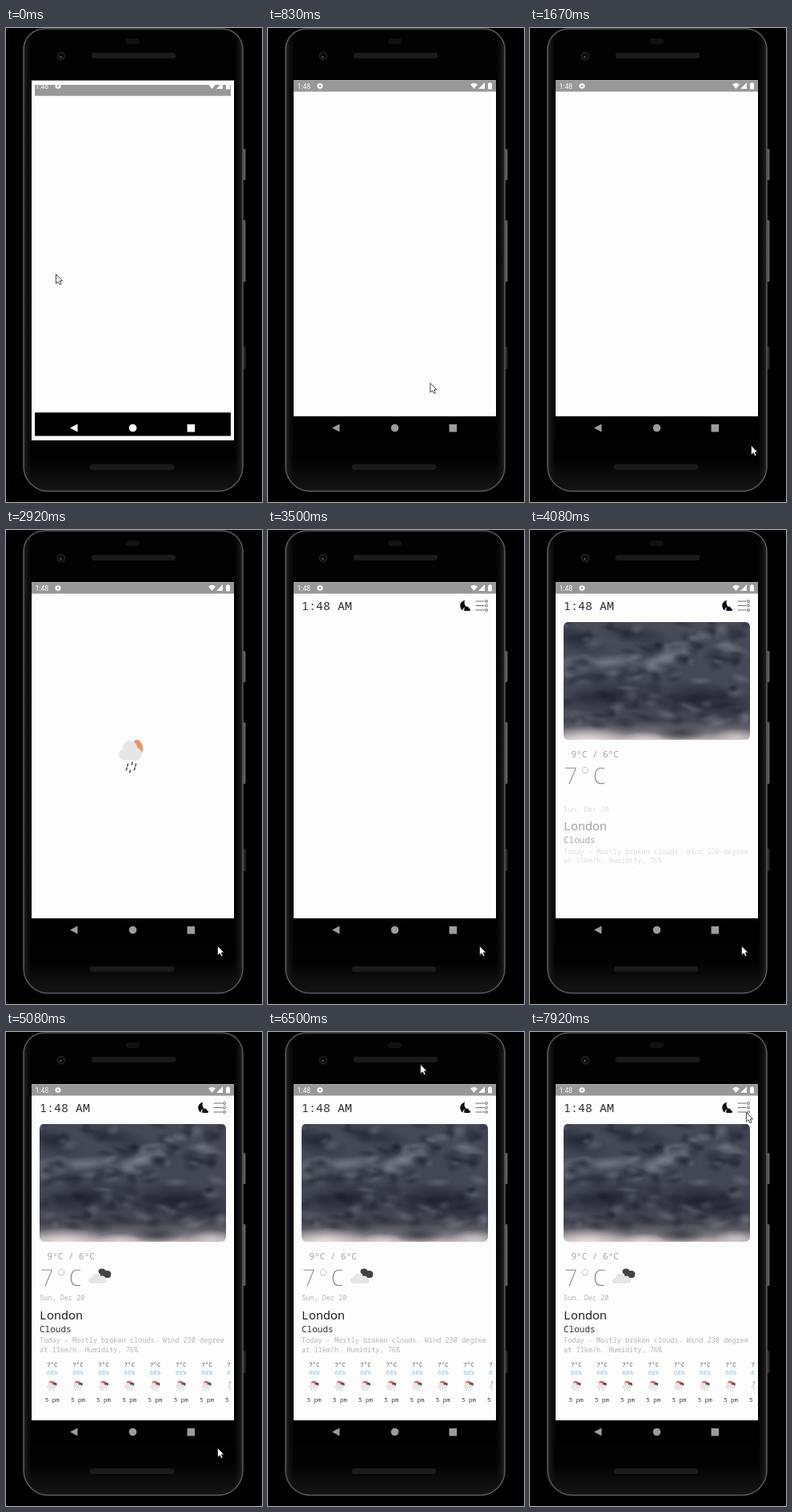
Recreate the animation shown at these times as an HTML page with a canvas. Size 320 by 592 pixels, loop 8 s.

```html
<!DOCTYPE html>
<html lang="en">
<head>
<meta charset="utf-8">
<title>Weather app</title>
<style>
html, body { margin: 0; width: 100%; height: 100%; overflow: hidden; background: #000; }
canvas { display: block; width: 320px; height: 592px; }
</style>
</head>
<body>
<canvas id="stage"></canvas>
<script>
const LOOP = 8000, STEP = 1000 / 12;
const MONO = '"Noto Sans Mono", "DejaVu Sans Mono", monospace';
const PAPER = '#fdfdfd', CLOUD = '#e6e6e8', BAR = '#989898', FAINT = '#b4b4b8';
const canvas = document.getElementById('stage');
const dpr = window.devicePixelRatio || 1;
canvas.width = 320 * dpr;
canvas.height = 592 * dpr;
const ctx = canvas.getContext('2d');

const clamp = v => Math.max(0, Math.min(1, v));
const easeOut = v => 1 - (1 - clamp(v)) ** 1.7;
const mix = (a, b, p) => a + (b - a) * p;

function rect(x, y, w, h, color, r = 0, c = ctx) {
  c.fillStyle = color;
  c.beginPath();
  c.roundRect(x, y, w, h, r);
  c.fill();
}
function oval(x, y, rx, ry, color, rot = 0) {
  ctx.fillStyle = color;
  ctx.beginPath();
  ctx.ellipse(x, y, rx, ry, rot, 0, 7);
  ctx.fill();
}
function poly(color, ...pts) {
  ctx.fillStyle = color;
  ctx.beginPath();
  for (let i = 0; i < pts.length; i += 2) ctx.lineTo(pts[i], pts[i + 1]);
  ctx.closePath();
  ctx.fill();
}
function line(x1, y1, x2, y2, color, w = 1) {
  ctx.strokeStyle = color;
  ctx.lineWidth = w;
  ctx.beginPath();
  ctx.moveTo(x1, y1);
  ctx.lineTo(x2, y2);
  ctx.stroke();
}
function text(str, x, y, size, color, weight = 400, align = 'left', family = MONO) {
  ctx.font = `${weight} ${size}px ${family}`;
  ctx.textAlign = align;
  ctx.fillStyle = color;
  ctx.fillText(str, x, y);
}
// Shaves the glyph edges for a hairline weight
function thinText(str, x, y, size, color) {
  text(str, x, y, size, color, 100);
  ctx.strokeStyle = PAPER;
  ctx.lineWidth = 1.4;
  ctx.lineJoin = 'round';
  ctx.strokeText(str, x, y);
}
function layer(alpha, dy, draw) {
  if (alpha <= 0) return;
  ctx.save();
  ctx.globalAlpha = alpha;
  ctx.translate(0, dy);
  draw();
  ctx.restore();
}

// Soft stormy sky, painted once
function paintSky() {
  const s = document.createElement('canvas');
  s.width = 466;
  s.height = 294;
  const c = s.getContext('2d');
  c.scale(2, 2);
  const g = c.createLinearGradient(0, 0, 0, 147);
  g.addColorStop(0, '#464a58');
  g.addColorStop(0.5, '#434754');
  g.addColorStop(0.84, '#41444f');
  g.addColorStop(0.94, '#77757c');
  g.addColorStop(1, '#bcb3b3');
  rect(0, 0, 233, 147, g, 0, c);
  const blob = (x, y, rx, ry, rot, rgb, a) => {
    c.save();
    c.translate(x, y);
    c.rotate(rot);
    c.scale(rx, ry);
    const f = c.createRadialGradient(0, 0, 0.1, 0, 0, 1);
    f.addColorStop(0, `rgba(${rgb},${a})`);
    f.addColorStop(1, `rgba(${rgb},0)`);
    c.fillStyle = f;
    c.fillRect(-1, -1, 2, 2);
    c.restore();
  };
  const light = '150,155,170', dark = '26,29,40';
  blob(15, 22, 45, 18, 0.3, dark, 0.6);
  blob(90, 15, 50, 14, 0.2, dark, 0.5);
  blob(180, 97, 65, 24, 0.15, dark, 0.75);
  blob(60, 92, 65, 20, -0.1, dark, 0.65);
  blob(55, 50, 48, 10, -0.1, light, 0.5);
  blob(125, 45, 42, 10, -0.35, light, 0.5);
  blob(200, 28, 38, 10, 0.4, light, 0.45);
  blob(25, 118, 35, 8, 0.2, light, 0.3);
  let seed = 11;
  const rnd = () => (seed = seed * 16807 % 2147483647) / 2147483647;
  for (let i = 0; i < 130; i++) {
    const lit = i % 3 === 0;
    blob(rnd() * 233, rnd() * 128, 6 + rnd() * 14, 4 + rnd() * 6,
      -0.4 + rnd() * 0.8, lit ? light : dark, lit ? 0.28 : 0.4);
  }
  blob(30, 147, 55, 18, 0, '232,222,220', 0.9);
  blob(100, 147, 30, 11, 0, '225,215,214', 0.8);
  blob(215, 144, 30, 12, 0, '215,207,208', 0.75);
  blob(147, 138, 32, 11, 0, '62,64,74', 0.9);
  return s;
}
const sky = paintSky();

function phone() {
  rect(0, 0, 320, 592, '#000');
  for (const [y, h, color] of [[151, 39, '#5e5e60'], [240, 77, '#5e5e60'], [398, 28, '#29292b']])
    rect(294, y, 5.5, h, color, 1.5);
  const shape = [26, 26, 31, 31];
  const g = ctx.createLinearGradient(21, 0, 297, 0);
  g.addColorStop(0, '#2c2c2e');
  g.addColorStop(0.02, '#101011');
  g.addColorStop(0.04, '#020202');
  g.addColorStop(0.96, '#020202');
  g.addColorStop(0.98, '#101011');
  g.addColorStop(1, '#2c2c2e');
  rect(21.5, 1, 275, 578, g, shape);
  const b = ctx.createLinearGradient(0, 540, 0, 579);
  b.addColorStop(0, 'rgba(24,24,26,0)');
  b.addColorStop(1, 'rgba(24,24,26,.9)');
  rect(22, 540, 274, 38, b, [0, 0, 31, 31]);
  ctx.strokeStyle = '#5c5c5e';
  ctx.lineWidth = 1.4;
  ctx.beginPath();
  ctx.roundRect(22, 1, 274, 577.5, shape);
  ctx.stroke();
  oval(69, 35, 5.5, 5.5, '#1b1b20');
  oval(69, 35, 3.2, 3.2, '#070709');
  oval(68.5, 36, 1.2, 1.2, '#5c5c72');
  rect(150, 13, 17, 7, '#111112', 3);
  rect(107, 31, 105, 7, '#1b1b1c', 3);
  rect(105, 545, 105, 7, '#1b1b1c', 3);
}

function cloudRain(x, y, k, sun, fall) {
  ctx.save();
  ctx.translate(x, y);
  ctx.scale(k, k);
  oval(8.5, -11, 6.5, 10, sun, -0.15);
  oval(-1, -11, 9, 9, CLOUD);
  oval(-8, -3, 7, 7, CLOUD);
  oval(6, -3, 8, 8, CLOUD);
  rect(-8, -5, 14, 9, CLOUD);
  [[-4, 9], [1, 9], [6, 9], [-6, 16], [-1, 17], [4, 16]].forEach(([dx, dy], i) => {
    const s = (fall * 2 + i * 2) % 4 - 2;
    line(dx + 1 - s * 0.3, dy - 2 + s, dx - s * 0.3, dy + 2 + s, '#5e5e62', 1.7);
  });
  ctx.restore();
}

function showers(x, y) {
  oval(x - 0.5, y - 2.5, 3.8, 3.8, '#e2664a');
  oval(x + 3.5, y - 2, 2.5, 2.2, '#55555a');
  rect(x - 6.5, y - 1.5, 11.5, 5, CLOUD, 2.5);
  oval(x - 2.2, y - 1, 3, 3, CLOUD);
  for (const dx of [-3, 0, 3]) line(x + dx, y + 4, x + dx - 0.7, y + 6, '#bcbcc0', 0.8);
}

function brokenClouds() {
  const dark = '#434346';
  oval(120, 299, 4.5, 3.6, dark);
  oval(126.5, 302, 5, 4, dark);
  rect(118, 300, 13, 7, dark, 3);
  oval(113, 307, 6, 5, CLOUD);
  oval(120, 309, 5, 4.5, CLOUD);
  rect(103, 307, 23, 7, CLOUD, 3.5);
}

function header() {
  text('1:48 AM', 42, 100, 15, '#2f2f32');
  ctx.fillStyle = '#0c0c0e';
  ctx.beginPath();
  ctx.moveTo(246, 87.5);
  ctx.quadraticCurveTo(239.5, 90, 240.2, 95.5);
  ctx.quadraticCurveTo(240.8, 99, 243.5, 100.5);
  ctx.quadraticCurveTo(243.5, 97, 247.5, 95.8);
  ctx.quadraticCurveTo(244.5, 92, 246, 87.5);
  ctx.fill();
  oval(248.3, 98, 2.8, 2.5, '#0c0c0e');
  rect(245, 98, 8, 3, '#0c0c0e', 1.5);
  for (const y of [89, 94.5, 100]) {
    line(259.5, y, 270.5, y, '#707074');
    ctx.beginPath();
    ctx.arc(273, y, 1.5, 0, 7);
    ctx.stroke();
  }
}

function picture() {
  ctx.save();
  ctx.beginPath();
  ctx.roundRect(42, 114.5, 233, 147.5, 6);
  ctx.clip();
  ctx.drawImage(sky, 42, 114.5, 233, 147.5);
  ctx.restore();
}

function hours() {
  ctx.save();
  ctx.beginPath();
  ctx.rect(42, 400, 239, 80);
  ctx.clip();
  for (let i = 0; i < 8; i++) {
    const x = 57.7 + i * 32.2;
    text('7°C', x, 417.5, 7.5, '#59595d', 400, 'center');
    text('68%', x, 428, 7.5, '#84bfe4', 400, 'center');
    showers(x, 442);
    text('5 pm', x, 462, 7.5, '#3c3c40', 400, 'center');
  }
  ctx.restore();
}

function content(t) {
  if (t >= 2000 && t < 3410) cloudRain(156, 283, 1, '#f0925c', t / 300);
  if (t < 3410) return;
  header();
  const rise = (start, dur, draw) => {
    const p = easeOut((t - start) / dur);
    layer(p, 28 * (1 - p), draw);
  };
  rise(3530, 600, picture);
  rise(3550, 600, () => {
    text('9°C / 6°C', 51.5, 283.5, 11, '#a2a2a6');
    thinText('7°C', 42, 317.5, 30, '#8c8c90');
  });
  rise(3910, 650, () => {
    text('Sun, Dec 20', 42, 335, 8.55, FAINT);
    text('London', 42, 358.5, 15, '#222225', 500);
    text('Clouds', 42, 374.5, 11, '#2d2d30', 500);
    text('Today - Mostly broken clouds. Wind 230 degree', 42, 388, 8.55, FAINT);
    text('at 11km/h. Humidity, 76%', 42, 399.5, 8.55, FAINT);
  });
  rise(4160, 600, hours);
  layer(easeOut((t - 4160) / 500), 0, brokenClouds);
}

function systemIcons(settle) {
  const pale = '#fafafa';
  text('1:48', 36.5, 75.8, 8.7, pale, 400, 'left', 'Roboto, sans-serif');
  for (let i = 0; i < 4; i++) {
    const a = i * Math.PI / 4, dx = 3.8 * Math.cos(a), dy = 3.8 * Math.sin(a);
    line(65 - dx, 72.5 - dy, 65 + dx, 72.5 + dy, pale, 1.7);
  }
  oval(65, 72.5, 2.8, 2.8, pale);
  oval(65, 72.5, 1.2, 1.2, BAR);
  ctx.fillStyle = pale;
  ctx.beginPath();
  ctx.moveTo(257.5, 76);
  ctx.lineTo(253, 70.5);
  ctx.quadraticCurveTo(257.5, 67, 262, 70.5);
  ctx.fill();
  poly(pale, 263, 76, 271, 76, 271, 68);
  rect(275, 69, 5, 7.5, pale, 0.7);
  rect(276.5, 68, 2, 2, pale);
  const nav = settle < 1 ? '#fff' : '#9c9c9c';
  poly(nav, 80, 499.5, 89.5, 494.5, 89.5, 504.5);
  oval(158.5, 499.5, 4.8, 4.8, nav);
  rect(226.5, 495, 9.5, 9.5, nav);
}

function screen(t) {
  const settle = clamp(t / 330);
  rect(32, 65.5, 253, 449.5, PAPER);
  ctx.save();
  ctx.translate(158.5, 290.3);
  ctx.scale(mix(0.968, 1, settle), mix(0.975, 1, settle));
  ctx.translate(-158.5, -290.3);
  rect(32, 65.5, 253, 449.5, PAPER);
  rect(32, 65.5, 253, 14, BAR);
  rect(32, 485, 253, 30, '#000');
  content(t);
  ctx.restore();
  systemIcons(settle);
}

// time, x, y
const path = [
  [0, 62, 307], [80, 62, 307], [750, 190, 430], [1330, 276, 521], [1750, 276, 521],
  [2330, 264, 519], [5990, 264, 519], [6170, 222, 370], [6330, 145, 190],
  [6500, 190, 40], [6660, 250, 85], [6750, 262, 113], [6920, 257, 107],
  [7080, 257, 107], [7170, 264, 106], [7330, 264, 102], [7670, 264, 102], [7920, 270, 100]
];
function cursor(t) {
  let i = 0;
  while (i < path.length - 2 && t >= path[i + 1][0]) i++;
  const [t0, x0, y0] = path[i], [t1, x1, y1] = path[i + 1];
  const p = clamp((t - t0) / (t1 - t0));
  ctx.save();
  ctx.translate(mix(x0, x1, p) + 0.5, mix(y0, y1, p) + 0.5);
  poly('#fff', 0, 0, 0, 11.5, 2.7, 9.2, 4.6, 13, 6.5, 12.1, 4.7, 8.4, 8, 8.2);
  ctx.strokeStyle = '#2c2c2e';
  ctx.lineWidth = 0.9;
  ctx.lineJoin = 'miter';
  ctx.stroke();
  ctx.restore();
}

function frame(now) {
  const t = Math.floor(((now % LOOP) + 5) / STEP) * STEP % LOOP;
  ctx.setTransform(dpr, 0, 0, dpr, 0, 0);
  phone();
  screen(t);
  cursor(t);
  requestAnimationFrame(frame);
}
requestAnimationFrame(frame);
</script>
</body>
</html>
```
